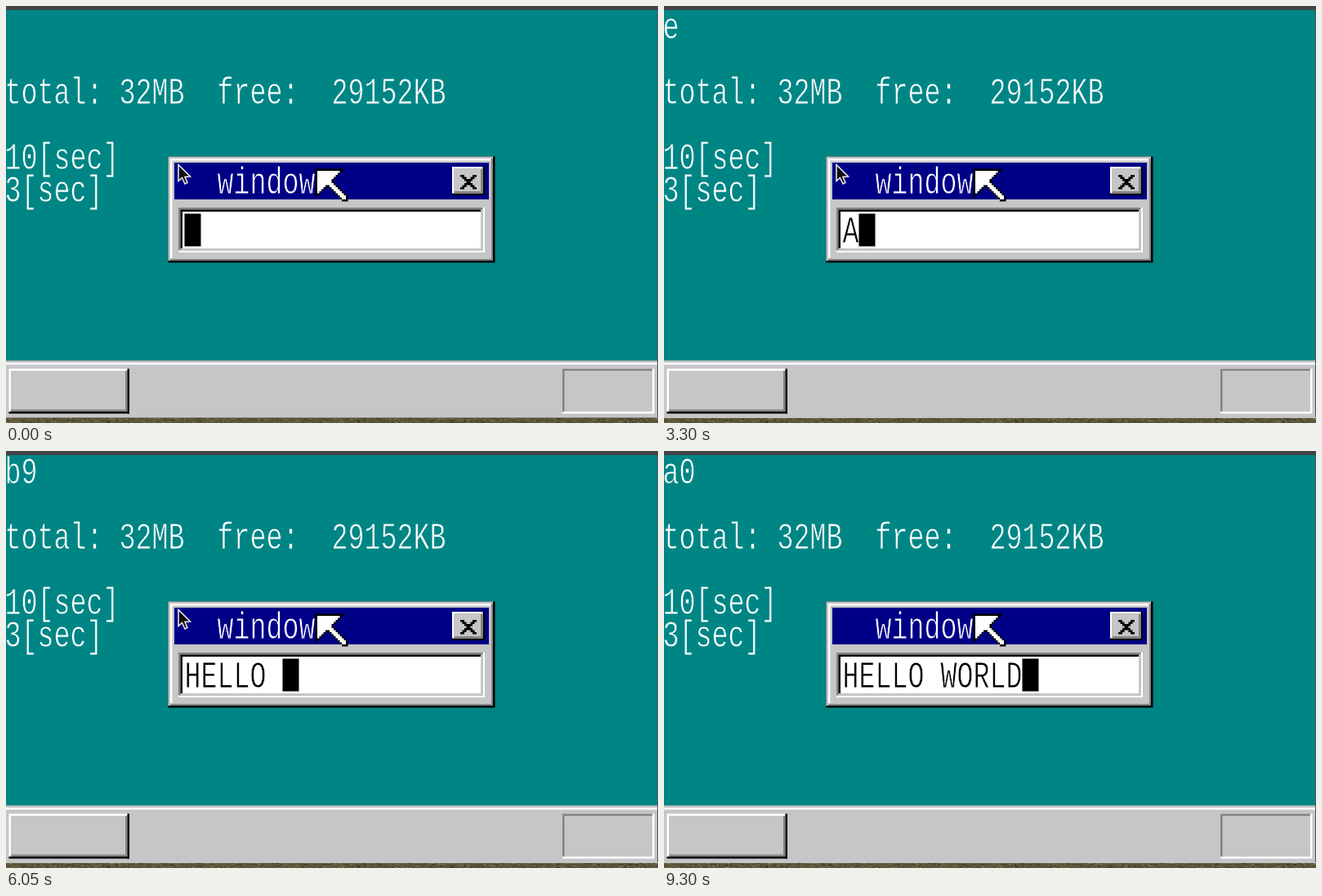
Recreate the animation shown at these times as an HTML page with a canvas. Size 798 px wide and 511 px high, loop 9400 ms.

```html
<!DOCTYPE html>
<html lang="en">
<head>
<meta charset="utf-8">
<title>Text box</title>
<style>
html, body { margin: 0; width: 100%; height: 100%; overflow: hidden; background: #444; }
canvas { display: block; }
</style>
</head>
<body>
<canvas width="798" height="511"></canvas>
<script>
const ctx = document.querySelector('canvas').getContext('2d');
const LOOP = 9400, SCALE = 2.5, LEFT = -1.5, TOP = 4.5;
const TEAL = '#008585', NAVY = '#000086', GREY = '#c6c5c7', DARK = '#848484';
const WHITE = '#fff', BLACK = '#000';

// Keyboard scan codes run through this layout, starting at 0x0e
const LAYOUT = "\b\tQWERTYUIOP[]\n^ASDFGHJKL;'`^\\ZXCVBNM,./^*^ ";

// [character, press time, release time]
const KEYS = [
  ['A', 600, 700], ['B', 1400, 1550], ['C', 1900, 2000], ['D', 2050, 2150], ['E', 2250, 2350],
  ['\b', 2750, 2850], ['\b', 2900, 3000], ['\b', 3100, 3200], ['\b', 3300, 3350], ['\b', 3450, 3550],
  ['H', 3850, 3950], ['E', 4300, 4350], ['L', 4900, 5000], ['L', 5200, 5350], ['O', 5450, 5550],
  [' ', 5850, 5950], ['W', 6150, 6350], ['O', 6450, 6600], ['R', 6600, 6650],
  ['L', 7100, 7200], ['D', 7300, 7400]
];

// The caret starts visible and flips at each of these times
const BLINKS = [450, 950, 1450, 1850, 2350, 2850, 3350, 3800, 4250, 4800,
  5400, 5850, 6350, 6850, 7450, 7950, 8450, 8950];

// Fills a box given by its first and last pixel, both included
function box(color, x0, y0, x1, y1) {
  ctx.fillStyle = color;
  ctx.fillRect(x0, y0, x1 - x0 + 1, y1 - y0 + 1);
}

// Writes in cells of 8 by 16 pixels; the backdrop outline keeps the strokes thin
function write(text, x, y, color = WHITE, backdrop = TEAL) {
  ctx.save();
  ctx.translate(x, y + 14);
  ctx.scale(1, 1.37);
  ctx.font = '13.33px "Liberation Mono", "Courier New", monospace';
  ctx.fillStyle = color;
  ctx.fillText(text, 0, 0);
  ctx.strokeStyle = backdrop;
  ctx.lineWidth = 0.25;
  ctx.strokeText(text, 0, 0);
  ctx.restore();
}

function drawDesktop() {
  box(TEAL, 0, 0, 319, 171);
  box(GREY, 0, 172, 319, 199);
  box(WHITE, 0, 173, 319, 173);
  box(WHITE, 2, 176, 59, 196);
  box(DARK, 3, 177, 59, 196);
  box(GREY, 3, 177, 58, 195);
  box(BLACK, 2, 197, 60, 197);
  box(BLACK, 60, 176, 60, 197);
  box(WHITE, 273, 176, 317, 197);
  box(DARK, 273, 176, 316, 196);
  box(GREY, 274, 177, 316, 196);
  write('total: 32MB  free:  29152KB', 0, 32);
  write('10[sec]', 0, 64);
  write('3[sec]', 0, 80);
}

function drawCloseButton(x, y) {
  box(BLACK, x, y, x + 15, y + 13);
  box(WHITE, x, y, x + 14, y + 12);
  box(DARK, x + 1, y + 1, x + 14, y + 12);
  box(GREY, x + 1, y + 1, x + 13, y + 11);
  ctx.beginPath();
  for (let i = 0; i < 7; i++) {
    const d = Math.abs(3 - i);
    ctx.rect(x + 7 - d, y + 4 + i, 2, 1);
    ctx.rect(x + 7 + d, y + 4 + i, 2, 1);
  }
  ctx.fillStyle = BLACK;
  ctx.fill();
}

function drawWindow(text, caret) {
  ctx.save();
  ctx.translate(80, 72);
  box(BLACK, 0, 0, 159, 51);
  box(GREY, 0, 0, 158, 50);
  box(DARK, 1, 1, 158, 50);
  box(WHITE, 1, 1, 157, 49);
  box(GREY, 2, 2, 157, 49);
  box(NAVY, 3, 3, 156, 20);
  write('window', 24, 4, WHITE, NAVY);
  drawCloseButton(139, 5);

  box(WHITE, 5, 25, 154, 46);
  box(DARK, 5, 25, 153, 45);
  box(GREY, 6, 26, 153, 45);
  box(BLACK, 6, 26, 152, 44);
  box(WHITE, 7, 27, 152, 44);
  write(text, 8, 28, BLACK, WHITE);
  const x = 8 + text.length * 8;
  if (caret) box(BLACK, x, 28, x + 7, 43);
  ctx.restore();
}

// Guest pointer: a head narrowing to a diagonal tail, outlined in black
function drawArrow(left, top) {
  const outer = new Path2D(), inner = new Path2D();
  const span = (x0, x1, y) => {
    outer.rect(left + x0, top + y, x1 - x0, 1);
    if (y > 0 && y < 15 && x1 - x0 > 2) inner.rect(left + x0 + 1, top + y, x1 - x0 - 2, 1);
  };
  for (let y = 0; y < 16; y++) {
    if (y < 8) {
      span(0, Math.max(14 - y, y + 3), y);
    } else {
      if (y < 14) span(0, 14 - y, y);
      span(y - 2, Math.min(16, y + 3), y);
    }
  }
  ctx.fillStyle = BLACK;
  ctx.fill(outer);
  ctx.fillStyle = WHITE;
  ctx.fill(inner);
}

// Host pointer, which leaves the stage near the end of the loop
function drawHostPointer(t) {
  const p = Math.max(0, (t - 8750) / 400);
  if (p >= 1) return;
  ctx.save();
  ctx.translate(211 + 600 * p * p, 194.5 - 200 * p * p);
  ctx.beginPath();
  for (const [x, y] of [[0, 0], [0, 20], [4.5, 16], [8, 23.5], [11, 22], [8, 15], [14.5, 14.5]]) ctx.lineTo(x, y);
  ctx.closePath();
  ctx.fillStyle = '#111';
  ctx.fill();
  ctx.strokeStyle = '#eee';
  ctx.lineWidth = 1.5;
  ctx.stroke();
  ctx.restore();
}

// Edges of the host screen, with a speckled strip of wallpaper below
function drawSurround() {
  box('#444446', 0, 0, 797, 4);
  box('#4a5254', 797, 5, 797, 503);
  box('#5a5438', 0, 505, 797, 510);
  const tones = ['#3a3726', '#6d6544', '#4a4632', '#776e4b', '#5c5e40'];
  let seed = 7;
  const random = n => (seed = seed * 16807 % 2147483647) % n;
  for (let i = 0; i < 900; i++) {
    const x = random(797), y = 505 + random(6);
    box(tones[random(5)], x, y, x + random(4), y);
  }
}

function stateAt(t) {
  let text = '', code = '';
  for (const [key, press, release] of KEYS) {
    if (t < press) break;
    text = key === '\b' ? text.slice(0, -1) : text + key;
    const scan = 14 + LAYOUT.indexOf(key);
    code = (t < release ? scan : scan + 128).toString(16);
  }
  const caret = BLINKS.filter(b => b <= t).length % 2 === 0;
  return { text, code, caret };
}

function frame(now) {
  const t = now % LOOP;
  const { text, code, caret } = stateAt(t);
  ctx.setTransform(SCALE, 0, 0, SCALE, LEFT, TOP);
  drawDesktop();
  write(code, 0, 0);
  drawWindow(text, caret);
  drawArrow(152, 78);
  ctx.setTransform(1, 0, 0, 1, 0, 0);
  drawSurround();
  drawHostPointer(t);
  requestAnimationFrame(frame);
}
requestAnimationFrame(frame);
</script>
</body>
</html>
```
